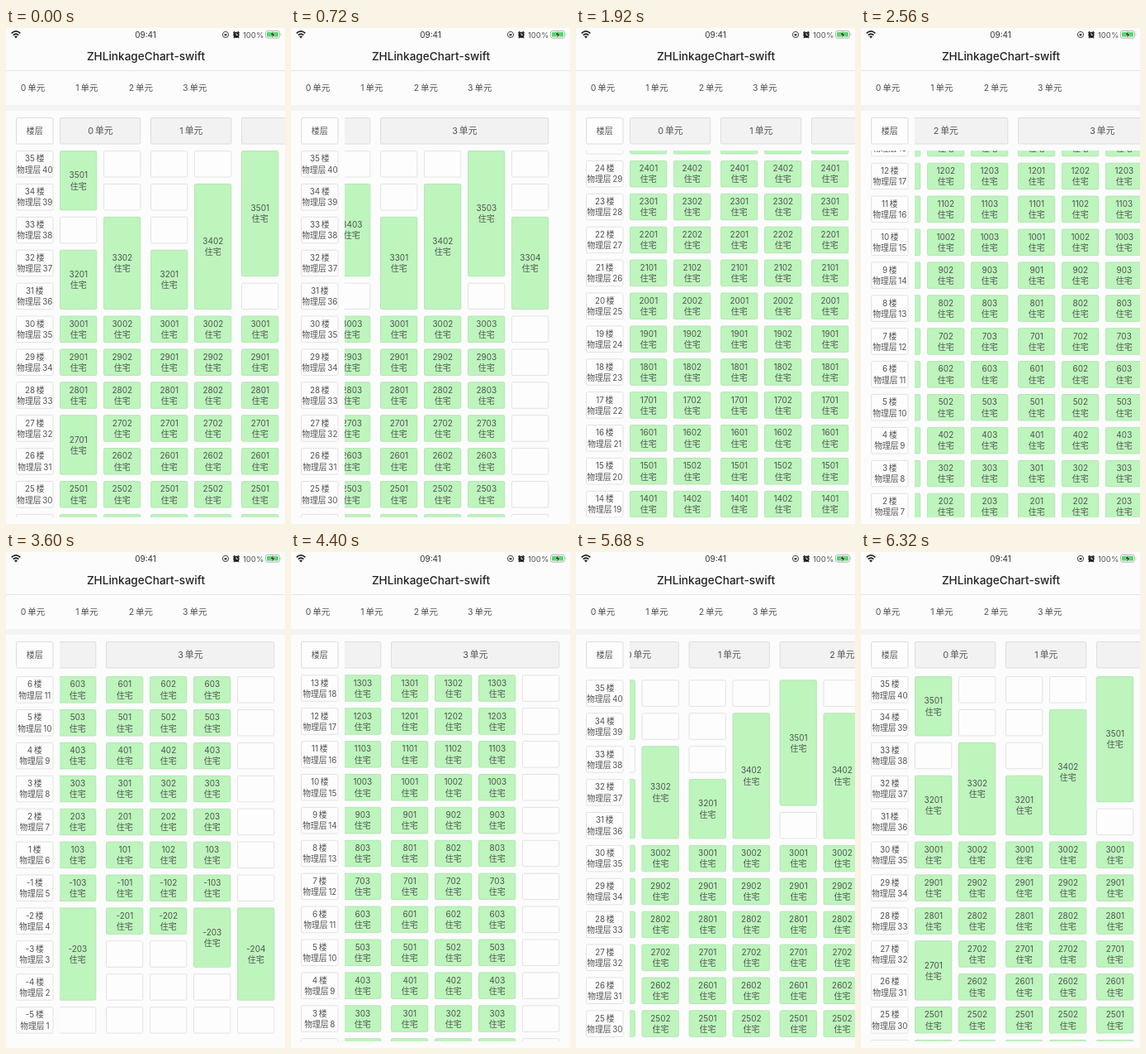
An HTML page that plays this animation: 338 by 599 pixels, repeating every 6.4 s.

```html
<!DOCTYPE html>
<html lang="zh-CN">
<head>
<meta charset="utf-8">
<style>
html, body { margin: 0; width: 100%; height: 100%; overflow: hidden; background: #fcfcfc; }
svg { display: block; width: 338px; height: 599px; }
text { font-family: Inter, "Noto Sans CJK SC", "Noto Sans CJK", sans-serif; font-size: 10px; fill: #505450; text-anchor: middle; }
</style>
</head>
<body>
<svg id="stage" viewBox="0 0 338 599" xmlns="http://www.w3.org/2000/svg">
  <defs>
    <clipPath id="headClip"><rect x="65" y="104" width="273" height="42"/></clipPath>
    <clipPath id="floorClip"><rect x="0" y="148" width="65" height="443"/></clipPath>
    <clipPath id="cellClip"><rect x="65" y="148" width="273" height="443"/></clipPath>
  </defs>
  <rect width="338" height="599" fill="#fcfcfc"/>
  <rect y="51" width="338" height="1" fill="#e6e6e6"/>
  <rect y="93" width="338" height="7" fill="#f3f3f3"/>

  <g fill="none" stroke="#222" stroke-width="1.7">
    <path d="M6.7 6.4Q12 1.5 17.3 6.4"/>
    <path d="M8.7 8.7Q12 5.8 15.3 8.7"/>
  </g>
  <path d="M10 10.2Q12 8.6 14 10.2L12 12.4Z" fill="#222"/>
  <text x="169" y="11.7" style="fill:#333">09:41</text>
  <circle cx="266" cy="8" r="3.6" fill="none" stroke="#444"/>
  <rect x="264.6" y="7" width="2.8" height="2.5" fill="#444"/>
  <circle cx="279" cy="8.3" r="3.6" fill="#222"/>
  <path d="M275.4 6L277.2 4.2M282.6 6L280.8 4.2M276.8 11L275.9 12.2M281.2 11L282.1 12.2" stroke="#222" stroke-width="1.3"/>
  <path d="M279 6V8.5H281" fill="none" stroke="#fff" stroke-width=".8"/>
  <text x="299.6" y="11.7" style="font-size:9.6px">100%</text>
  <rect x="314.5" y="3.5" width="17" height="8.6" rx="2.3" fill="#fff" stroke="#aaa" stroke-width=".9"/>
  <rect x="316" y="5" width="14" height="5.6" rx="1.2" fill="#4cd964"/>
  <path d="M332.8 6.2Q334.4 7.8 332.8 9.4Z" fill="#aaa"/>
  <path d="M324.2 3.4L319.8 8.4H322.6L321.8 12.2L326.2 7.1H323.4Z" fill="#222" stroke="#fff" stroke-width=".5"/>
  <text x="169.5" y="38.6" style="font-size:13.6px;font-weight:500;fill:#222">ZHLinkageChart-swift</text>

  <g id="tabs"></g>
  <g id="corner"></g>
  <g clip-path="url(#headClip)"><g id="heads"></g></g>
  <g clip-path="url(#floorClip)"><g id="floors"></g></g>
  <g clip-path="url(#cellClip)"><g id="cells"></g></g>
</svg>
<script>
const NS = 'http://www.w3.org/2000/svg';
const LOOP = 6400, STEP = 80;
const TOP = 148, ROW = 39.9, CELL_H = 32.5, COL = 53, CELL_W = 45.3, ROWS = 40;
const THIN = '\u2009';
const $ = id => document.getElementById(id);

function add(parent, tag, attrs, content) {
  const el = document.createElementNS(NS, tag);
  for (const k in attrs) el.setAttribute(k, attrs[k]);
  if (content) el.textContent = content;
  parent.appendChild(el);
}

function box(parent, x, y, w, h, fill, stroke) {
  add(parent, 'rect', { x: x + .5, y: y + .5, width: w - 1, height: h - 1, rx: 1.5, fill, stroke, 'stroke-width': .9 });
}

function label(parent, x, y, content, size = 10) {
  add(parent, 'text', { x, y: y + 3.6, style: `font-size:${size}px` }, content);
}

function twoLines(parent, x, mid, a, b, size) {
  label(parent, x, mid - 6.5, a, size);
  label(parent, x, mid + 6.7, b, size);
}

const floorAt = row => row < 35 ? 35 - row : 34 - row;
const rowOf = floor => floor > 0 ? 35 - floor : 34 - floor;

// Per column: merged rooms as [floor, span]. Plain rooms run from floor 30 to -2,
// except in the sparse column, which has only merged rooms.
const units = [
  { x: 65, cols: [[[35, 2], [32, 2], [27, 2]], [[33, 3]]] },
  { x: 175, cols: [[[32, 2]], [[34, 4]]] },
  { x: 285, cols: [[[35, 4]], [[34, 4]], [[34, 3], [-2, 3]]] },
  { x: 448, cols: [[[33, 3]], [[34, 4]], [[35, 4], [-2, 2]], [[33, 3], [-2, 3]]], sparse: 3 }
];

function drawColumn(x, merged, num, sparse) {
  const g = $('cells');
  for (let row = 0; row < ROWS;) {
    const floor = floorAt(row);
    const hit = merged.find(m => rowOf(m[0]) === row);
    const span = hit ? hit[1] : 1;
    const used = hit || (!sparse && row >= 5 && row <= 36);
    const y = TOP + row * ROW, h = (span - 1) * ROW + CELL_H;
    box(g, x, y, CELL_W, h, used ? '#bdf5bd' : '#fdfdfd', used ? '#b5e2b5' : '#e0e0e0');
    if (used) twoLines(g, x + CELL_W / 2 + .2, y + h / 2, floor + '0' + num, '住宅');
    row += span;
  }
}

units.forEach((u, i) => {
  const w = (u.cols.length - 1) * COL + CELL_W, name = i + THIN + '单元';
  label($('tabs'), 32.5 + i * 65.4, 72, name, 10.5);
  box($('heads'), u.x, 108, w, 32.5, '#f2f2f2', '#dadada');
  label($('heads'), u.x + w / 2 + .2, 124.5, name, 10.8);
  u.cols.forEach((merged, c) => drawColumn(u.x + c * COL, merged, c + 1, u.sparse === c));
});

box($('corner'), 12, 108, 45.5, 32.5, '#fdfdfd', '#dadada');
label($('corner'), 34.7, 124.5, '楼层');
for (let row = 0; row < ROWS; row++) {
  const y = TOP + row * ROW;
  box($('floors'), 12, y, 45.5, CELL_H, '#fdfdfd', '#e0e0e0');
  twoLines($('floors'), 34.8, y + CELL_H / 2, floorAt(row) + THIN + '楼', '物理层' + THIN + (ROWS - row), 9.8);
}

// Scroll offsets as [time, value], joined by monotone cubics.
const scrollX = [[0, 0], [720, 340], [880, 327], [960, 327], [1440, 0], [1920, 0], [2560, 258],
  [2880, 327], [4560, 327], [5200, 273], [5840, 0], [6400, 0]];
const scrollY = [[0, 0], [1360, 0], [1920, 427], [2560, 903], [3040, 1155], [3840, 1155],
  [5200, 214.4], [5760, -14], [6320, -2], [6400, 0]];

function slope(k, i) {
  if (i === 0 || i === k.length - 1) return 0;
  const a = (k[i][1] - k[i - 1][1]) / (k[i][0] - k[i - 1][0]);
  const b = (k[i + 1][1] - k[i][1]) / (k[i + 1][0] - k[i][0]);
  return a * b > 0 ? 2 * a * b / (a + b) : 0;
}

function sample(k, t) {
  let i = 0;
  while (i < k.length - 2 && t >= k[i + 1][0]) i++;
  const [t0, a] = k[i], [t1, b] = k[i + 1], d = t1 - t0;
  const s = (t - t0) / d, s2 = s * s, s3 = s2 * s;
  return a + (b - a) * (3 * s2 - 2 * s3) +
    d * (slope(k, i) * (s3 - 2 * s2 + s) + slope(k, i + 1) * (s3 - s2));
}

function render(t) {
  const x = -sample(scrollX, t), y = -sample(scrollY, t);
  $('heads').setAttribute('transform', `translate(${x} 0)`);
  $('floors').setAttribute('transform', `translate(0 ${y})`);
  $('cells').setAttribute('transform', `translate(${x} ${y})`);
}

const start = performance.now();
function tick() {
  const t = (performance.now() - start) % LOOP;
  render(Math.floor(t / STEP) * STEP);
  requestAnimationFrame(tick);
}
tick();
</script>
</body>
</html>
```
